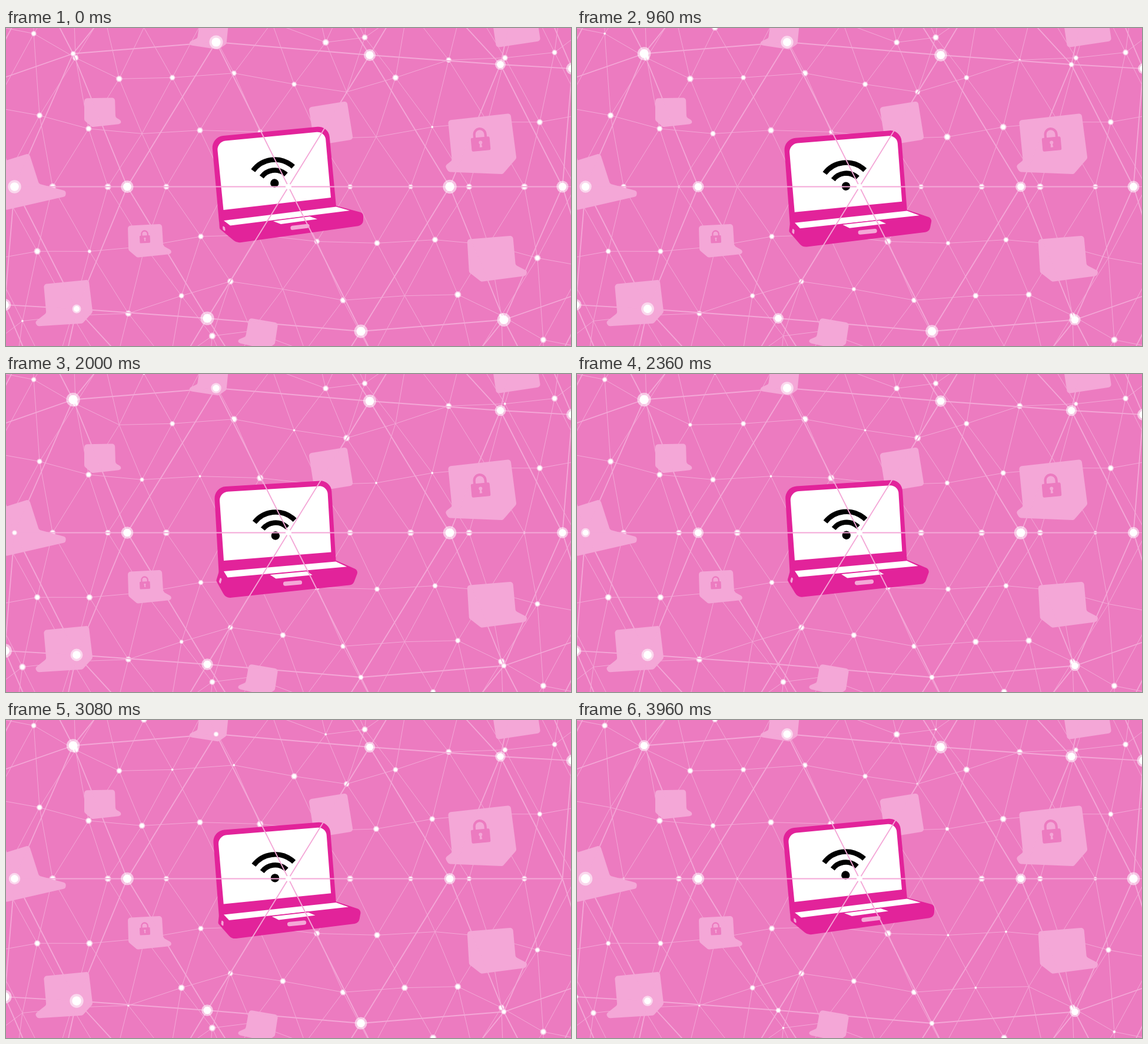
An HTML page with a canvas for the animation above (4000 ms loop, 960 by 540 pixels).

```html
<!DOCTYPE html>
<html lang="en">
<head>
<meta charset="utf-8">
<title>Connected laptop</title>
<style>
html, body { margin: 0; width: 100%; height: 100%; overflow: hidden; background: #ec7bc0; }
canvas { display: block; width: 960px; height: 540px; }
</style>
</head>
<body>
<canvas id="stage" width="960" height="540"></canvas>
<script>
const ctx = document.getElementById('stage').getContext('2d');
const LOOP = 4000;
const BACK = '#ec7bc0', PALE = '#f4a7d7', DEEP = '#e2239a';
const CX = 480, CY = 269.5;

const mirror = ([x, y]) => [2 * CX - x, 2 * CY - y];
const mix = (a, b, k) => a + (b - a) * k;
const ease = k => k * k * (3 - 2 * k);
const rand = n => { const s = Math.sin(n * 127.1 + 11.7) * 43758.5453; return s - Math.floor(s); };

function fill(path, color) {
  ctx.fillStyle = color;
  ctx.fill(path);
}

function stroke(path, color, width) {
  ctx.strokeStyle = color;
  ctx.lineWidth = width;
  ctx.stroke(path);
}

function disc(x, y, r, color) {
  const path = new Path2D();
  path.arc(x, y, r, 0, Math.PI * 2);
  fill(path, color);
}

function addLine(path, a, b) {
  path.moveTo(...a);
  path.lineTo(...b);
}

// radius: one number, or one per corner
function roundPoly(points, radius) {
  const path = new Path2D(), n = points.length;
  const [last, first] = [points[n - 1], points[0]];
  path.moveTo((last[0] + first[0]) / 2, (last[1] + first[1]) / 2);
  points.forEach((p, i) => path.arcTo(...p, ...points[(i + 1) % n], radius[i] ?? radius));
  path.closePath();
  return path;
}

// Triangular lattice bent over a globe; s counts along a row, r counts rows upwards.
function latticePoint(s, r) {
  if (r < 0) return mirror(latticePoint(-s, -r));
  const x = s * (105 - 4.5 * r - 0.3 * s * s) + 2.4 * r * r * Math.cos(0.4 * Math.PI * s);
  const y = r * (87 + 1.4 * s * s - 8 * Math.sin(Math.PI * s / 2));
  return [CX + x, CY - y];
}

const dots = [];
const thinLines = new Path2D();
for (let r = -4; r <= 4; r++) {
  for (let s = -6 + Math.abs(r % 2) / 2; s <= 6; s++) {
    const p = latticePoint(s, r);
    if (s || r) dots.push(p);
    addLine(thinLines, p, latticePoint(s + 1, r));
    addLine(thinLines, p, latticePoint(s - 0.5, r + 1));
    addLine(thinLines, p, latticePoint(s + 0.5, r + 1));
  }
}

// Coarse net: the upper half, repeated by point symmetry, with near neighbours joined.
const upperHubs = [
  [206, CY], [14.5, CY], [357, 24], [618, 46], [114, 43.5], [840, 62], [962, 69],
  [480, -170], [270, -150], [700, -90], [880, -120], [50, -80], [-40, 97]
];
const hubs = upperHubs.concat(upperHubs.map(mirror));
const thickLines = new Path2D();
[[CX, CY], ...hubs].forEach((a, i, all) => all.slice(i + 1).forEach(b => {
  if (Math.hypot(a[0] - b[0], a[1] - b[1]) < 288.5) addLine(thickLines, a, b);
}));

function nodeSize(seed) {
  const v = rand(seed);
  return v < 0.1 ? 0 : v < 0.24 ? 0.4 : mix(0.8, 1.1, rand(seed + 0.5));
}

// A node holds a size, then moves briefly to the next one.
function drawNode([x, y], id, size, t) {
  const beat = t / 800 + rand(id + 300);
  const step = Math.floor(beat);
  const seed = id * 13 + step;
  const k = ease(Math.min(1, (beat - step) / 0.2));
  const r = size * mix(nodeSize(seed), nodeSize(seed + 1), k);
  disc(x, y, r, 'rgba(255,255,255,.55)');
  disc(x, y, r * 0.66, '#fff');
}

// Background laptops as plain silhouettes; tab is how far the keyboard juts out.
function device(x, y, width, angle, side, tab) {
  const shape = tab
    ? [[-0.5, -0.34], [0.5, -0.36], [0.52, 0.28], [0.52 + tab, 0.28 + 0.6 * tab],
       [0.48 + tab, 0.38 + 0.6 * tab], [-0.25, 0.6], [-0.5, 0.38]]
    : [[-0.5, -0.5], [0.5, -0.5], [0.5, 0.5], [-0.5, 0.5]];
  const c = Math.cos(angle) * width, s = Math.sin(angle) * width;
  return roundPoly(shape.map(([u, v]) => [x + u * side * c - v * s, y + u * side * s + v * c]), 5);
}
const devices = [
  device(159, 137, 52, 0, 1, 0.2),
  device(236.5, 354.5, 58, -0.03, 1, 0.25),
  device(824, 383, 78, -0.06, 1, 0.25),
  device(7, 254, 85, -0.28, 1, 0.48),
  device(809, 188, 107, -0.13, -1, 0.12),
  device(105.5, 458, 77, -0.12, -1, 0.27),
  device(352, 6, 49, 0.1, -1, 0.28),
  device(435, 514, 50, 0.15, -1, 0.25),
  device(552, 162, 66, -0.16, 1, 0),
  device(865, -10, 76, -0.15, 1, 0)
];

function padlock(x, y, scale, angle) {
  ctx.save();
  ctx.translate(x, y);
  ctx.rotate(angle);
  ctx.scale(scale, scale);
  const shackle = new Path2D();
  shackle.moveTo(-9.5, -10);
  shackle.arc(0, -16, 9.5, Math.PI, 0);
  shackle.lineTo(9.5, -10);
  stroke(shackle, BACK, 4.2);
  fill(roundPoly([[-16, -11], [16, -11], [16, 12], [-16, 12]], 2.5), BACK);
  disc(0, -2, 3, PALE);
  fill(roundPoly([[-1.3, -1], [1.3, -1], [2.2, 6], [-2.2, 6]], 0), PALE);
  ctx.restore();
}

// Shears a point about the hinge: the lid barely leans, the keyboard swings out.
function tiltPoint([x, y], k) {
  const below = y - (328 - 0.13 * (x - 362));
  const dx = below * (below < 0 ? -0.03 : -0.45);
  const dy = 7.5 + 0.035 * (x - 355) + 0.17 * Math.max(0, below);
  return [x + dx * k, y + dy * k];
}

function drawWifi(k) {
  ctx.save();
  ctx.translate(...tiltPoint([456.3, 263.5], k));
  ctx.rotate(mix(-0.096, -0.058, k));
  for (const radius of [28, 46]) {
    const arc = new Path2D();
    arc.arc(0, 6, radius, -Math.PI / 2 - 0.84, -Math.PI / 2 + 0.84);
    stroke(arc, '#000', 8.5);
  }
  disc(0, 0, 7.2, '#000');
  ctx.restore();
}

function drawLaptop(k) {
  const shape = (points, radius) => roundPoly(points.map(p => tiltPoint(p, k)), radius);
  fill(shape([[349, 185], [548, 166], [561, 303], [362, 329]], [20, 19, 0, 0]), DEEP);
  fill(shape([[362, 327], [561, 302], [607, 314], [607, 335], [392, 365], [363, 341]],
    [0, 2, 7, 10, 14, 4]), DEEP);
  fill(shape([[358, 193], [542, 175.5], [552, 288], [369.5, 309]], [15, 14, 0, 0]), '#fff');
  fill(shape([[370, 327], [561, 303.5], [584, 310], [381, 335.5]], 0), '#fff');
  const pad = shape([[454, 328], [516, 320], [529, 324.5], [467, 333]], 0);
  stroke(pad, DEEP, 2.5);
  fill(pad, '#fff');
  fill(shape([[368, 335.5], [372, 338.5], [373, 346], [368.5, 342]], 1), PALE);
  const notch = new Path2D();
  addLine(notch, tiltPoint([487, 339.3], k), tiltPoint([512, 336.3], k));
  ctx.lineCap = 'round';
  stroke(notch, PALE, 7.2);
  ctx.lineCap = 'butt';
  drawWifi(k);
}

function draw(t) {
  ctx.fillStyle = BACK;
  ctx.fillRect(0, 0, 960, 540);
  stroke(thinLines, PALE, 1);
  dots.forEach((p, i) => drawNode(p, i, 5.2, t));
  devices.forEach(path => fill(path, PALE));
  padlock(806.5, 196.5, 1, -0.09);
  padlock(236, 358.5, 0.55, -0.05);
  drawLaptop((1 - Math.cos(t / LOOP * Math.PI * 2)) / 2);
  stroke(thickLines, PALE, 1.8);
  hubs.forEach((p, i) => drawNode(p, i + 500, 10.8, t));
  disc(CX, CY, 5, '#fff');
}

const start = performance.now();
function tick() {
  const t = (performance.now() - start) % LOOP;
  draw(Math.floor(t / 40) * 40);
  requestAnimationFrame(tick);
}
tick();
</script>
</body>
</html>
```
